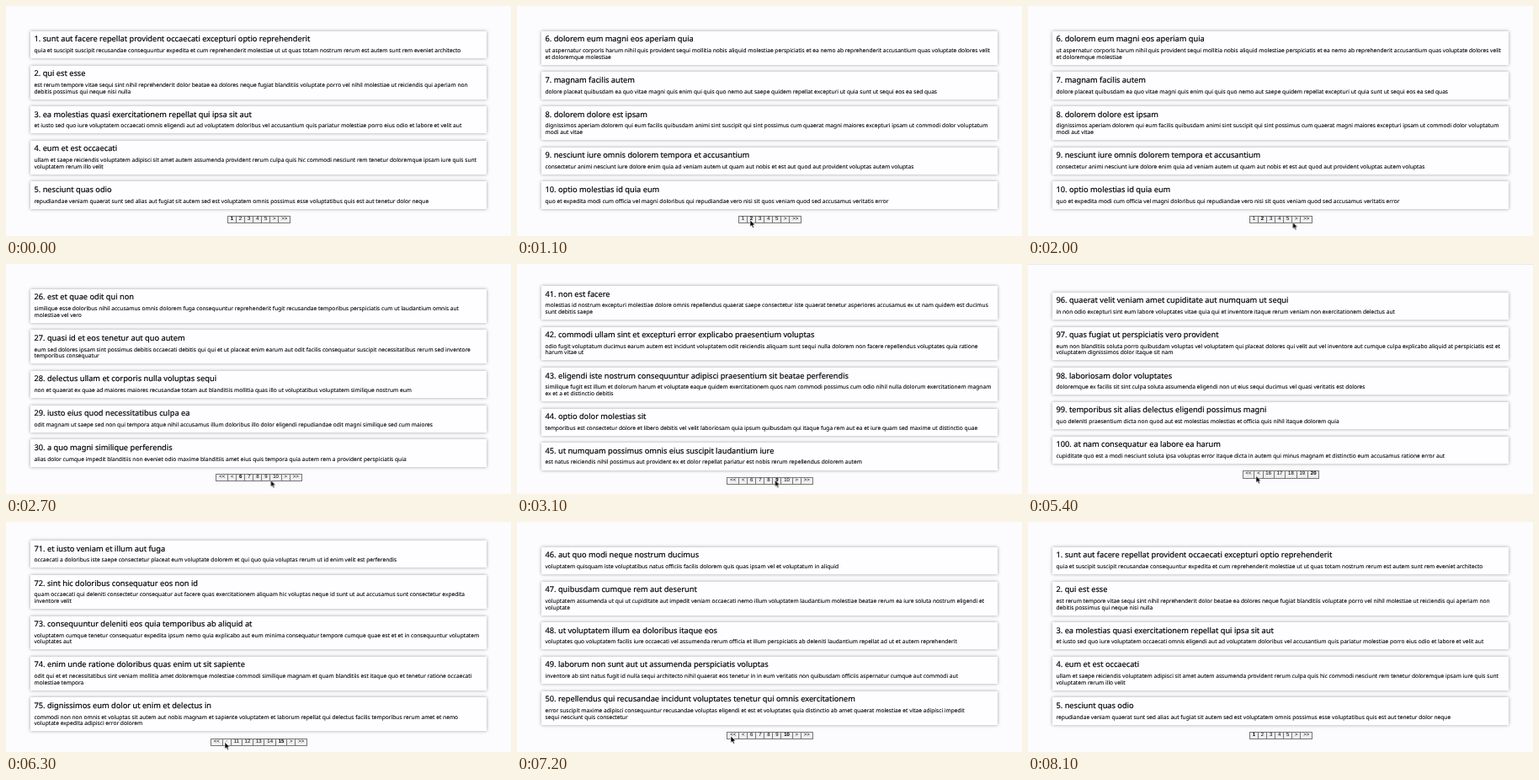
Animation of 600 by 273 pixels, one loop 8.5 s. Source, as an HTML page:

```html
<!DOCTYPE html>
<html lang="la">
<head>
<meta charset="utf-8">
<title>Paged posts</title>
<style>
html, body { margin: 0; width: 100%; height: 100%; overflow: hidden; background: #fcfbfd; }
#stage { position: relative; width: 600px; height: 273px; overflow: hidden; text-rendering: geometricPrecision; }
.page {
  box-sizing: border-box; height: 273px; padding: 15.4px 29px 0;
  display: flex; flex-direction: column; justify-content: center;
}
.last { box-shadow: inset 0 1px #e9e8ea; }
.card {
  flex: none; box-sizing: border-box; margin-bottom: 8.6px; padding: 3.5px 4.5px 5.4px;
  background: #fefdff; box-shadow: 0 0 4px rgba(0, 0, 0, .36);
  font-family: "Noto Sans", sans-serif; color: #000; white-space: pre;
}
h3 { margin: 0 0 3.6px; font-size: 9.24px; line-height: 12px; font-weight: 400; -webkit-text-stroke: .18px; }
p { margin: 0; font-size: 6.63px; line-height: 7.7px; -webkit-text-stroke: .08px; }
nav { flex: none; display: flex; justify-content: center; height: 9.2px; }
nav span {
  box-sizing: border-box; margin-right: -1px; padding: 0 2.85px; border: 1px solid #777; background: #efefef;
  font: 6px/7.2px "Liberation Sans", Arial, sans-serif; color: #000;
}
nav .on { font-weight: 700; }
#strip { animation: turn 8.5s step-end infinite; }
#cursor { position: absolute; left: 0; top: 0; animation: glide 8.5s ease-in-out infinite, show 8.5s step-end infinite; }
.press { animation: press 8.5s step-end infinite; }

@keyframes turn {
  0% { transform: translateY(0); }
  12.93% { transform: translateY(-273px); }
  25.87% { transform: translateY(-546px); }
  34.1% { transform: translateY(-819px); }
  43.52% { transform: translateY(-1092px); }
  64.7% { transform: translateY(-1365px); }
  75.28% { transform: translateY(-1638px); }
  85.87%, 100% { transform: translateY(0); }
}
@keyframes glide {
  0%, 7.05% { transform: translate(330px, 222px); }
  11.76%, 17.65% { transform: translate(277px, 254px); }
  23.5%, 31.76% { transform: translate(314.5px, 256.5px); }
  34.1%, 37.65% { transform: translate(306.5px, 256.3px); }
  41.18%, 54.12% { transform: translate(341.5px, 258.7px); }
  62.35%, 68.24% { transform: translate(271px, 251.5px); }
  72.94%, 80% { transform: translate(260px, 261.3px); }
  82.35%, 91.76% { transform: translate(254px, 254px); }
  95.28%, 100% { transform: translate(240px, 238px); }
}
@keyframes show {
  0% { visibility: hidden; }
  7.05% { visibility: visible; }
  95.28%, 100% { visibility: hidden; }
}
@keyframes press {
  0% { color: #000; background: #efefef; }
  72.9% { color: #999; background: #f5f5f5; }
  75.28%, 100% { color: #000; background: #efefef; }
}
</style>
</head>
<body>
<div id="stage">
  <div id="strip"></div>
  <svg id="cursor" width="8" height="12" viewBox="0 0 8 12" overflow="visible">
    <path d="M0 0V8L1.9 6.4 3.1 9.2 4.5 8.6 3.3 5.9H5.7Z" fill="#000" stroke="#fff" stroke-width=".6"/>
  </svg>
</div>
<script>
// Title and body alternate; "/" marks a line break.
const posts = {
  1: `sunt aut facere repellat provident occaecati excepturi optio reprehenderit
quia et suscipit suscipit recusandae consequuntur expedita et cum reprehenderit molestiae ut ut quas totam nostrum rerum est autem sunt rem eveniet architecto
qui est esse
est rerum tempore vitae sequi sint nihil reprehenderit dolor beatae ea dolores neque fugiat blanditiis voluptate porro vel nihil molestiae ut reiciendis qui aperiam non/debitis possimus qui neque nisi nulla
ea molestias quasi exercitationem repellat qui ipsa sit aut
et iusto sed quo iure voluptatem occaecati omnis eligendi aut ad voluptatem doloribus vel accusantium quis pariatur molestiae porro eius odio et labore et velit aut
eum et est occaecati
ullam et saepe reiciendis voluptatem adipisci sit amet autem assumenda provident rerum culpa quis hic commodi nesciunt rem tenetur doloremque ipsam iure quis sunt/voluptatem rerum illo velit
nesciunt quas odio
repudiandae veniam quaerat sunt sed alias aut fugiat sit autem sed est voluptatem omnis possimus esse voluptatibus quis est aut tenetur dolor neque`,
  2: `dolorem eum magni eos aperiam quia
ut aspernatur corporis harum nihil quis provident sequi mollitia nobis aliquid molestiae perspiciatis et ea nemo ab reprehenderit accusantium quas voluptate dolores velit/et doloremque molestiae
magnam facilis autem
dolore placeat quibusdam ea quo vitae magni quis enim qui quis quo nemo aut saepe quidem repellat excepturi ut quia sunt ut sequi eos ea sed quas
dolorem dolore est ipsam
dignissimos aperiam dolorem qui eum facilis quibusdam animi sint suscipit qui sint possimus cum quaerat magni maiores excepturi ipsam ut commodi dolor voluptatum/modi aut vitae
nesciunt iure omnis dolorem tempora et accusantium
consectetur animi nesciunt iure dolore enim quia ad veniam autem ut quam aut nobis et est aut quod aut provident voluptas autem voluptas
optio molestias id quia eum
quo et expedita modi cum officia vel magni doloribus qui repudiandae vero nisi sit quos veniam quod sed accusamus veritatis error`,
  6: `est et quae odit qui non
similique esse doloribus nihil accusamus omnis dolorem fuga consequuntur reprehenderit fugit recusandae temporibus perspiciatis cum ut laudantium omnis aut/molestiae vel vero
quasi id et eos tenetur aut quo autem
eum sed dolores ipsam sint possimus debitis occaecati debitis qui qui et ut placeat enim earum aut odit facilis consequatur suscipit necessitatibus rerum sed inventore/temporibus consequatur
delectus ullam et corporis nulla voluptas sequi
non et quaerat ex quae ad maiores maiores recusandae totam aut blanditiis mollitia quas illo ut voluptatibus voluptatem similique nostrum eum
iusto eius quod necessitatibus culpa ea
odit magnam ut saepe sed non qui tempora atque nihil accusamus illum doloribus illo dolor eligendi repudiandae odit magni similique sed cum maiores
a quo magni similique perferendis
alias dolor cumque impedit blanditiis non eveniet odio maxime blanditiis amet eius quis tempora quia autem rem a provident perspiciatis quia`,
  9: `non est facere
molestias id nostrum excepturi molestiae dolore omnis repellendus quaerat saepe consectetur iste quaerat tenetur asperiores accusamus ex ut nam quidem est ducimus/sunt debitis saepe
commodi ullam sint et excepturi error explicabo praesentium voluptas
odio fugit voluptatum ducimus earum autem est incidunt voluptatem odit reiciendis aliquam sunt sequi nulla dolorem non facere repellendus voluptates quia ratione/harum vitae ut
eligendi iste nostrum consequuntur adipisci praesentium sit beatae perferendis
similique fugit est illum et dolorum harum et voluptate eaque quidem exercitationem quos nam commodi possimus cum odio nihil nulla dolorum exercitationem magnam/ex et a et distinctio debitis
optio dolor molestias sit
temporibus est consectetur dolore et libero debitis vel velit laboriosam quia ipsum quibusdam qui itaque fuga rem aut ea et iure quam sed maxime ut distinctio quae
ut numquam possimus omnis eius suscipit laudantium iure
est natus reiciendis nihil possimus aut provident ex et dolor repellat pariatur est nobis rerum repellendus dolorem autem`,
  20: `quaerat velit veniam amet cupiditate aut numquam ut sequi
in non odio excepturi sint eum labore voluptates vitae quia qui et inventore itaque rerum veniam non exercitationem delectus aut
quas fugiat ut perspiciatis vero provident
eum non blanditiis soluta porro quibusdam voluptas vel voluptatem qui placeat dolores qui velit aut vel inventore aut cumque culpa explicabo aliquid at perspiciatis est et/voluptatem dignissimos dolor itaque sit nam
laboriosam dolor voluptates
doloremque ex facilis sit sint culpa soluta assumenda eligendi non ut eius sequi ducimus vel quasi veritatis est dolores
temporibus sit alias delectus eligendi possimus magni
quo deleniti praesentium dicta non quod aut est molestias molestias et officia quis nihil itaque dolorem quia
at nam consequatur ea labore ea harum
cupiditate quo est a modi nesciunt soluta ipsa voluptas error itaque dicta in autem qui minus magnam et distinctio eum accusamus ratione error aut`,
  15: `et iusto veniam et illum aut fuga
occaecati a doloribus iste saepe consectetur placeat eum voluptate dolorem et qui quo quia voluptas rerum ut id enim velit est perferendis
sint hic doloribus consequatur eos non id
quam occaecati qui deleniti consectetur consequatur aut facere quas exercitationem aliquam hic voluptas neque id sunt ut aut accusamus sunt consectetur expedita/inventore velit
consequuntur deleniti eos quia temporibus ab aliquid at
voluptatem cumque tenetur consequatur expedita ipsum nemo quia explicabo aut eum minima consequatur tempore cumque quae est et et in consequuntur voluptatem/voluptates aut
enim unde ratione doloribus quas enim ut sit sapiente
odit qui et et necessitatibus sint veniam mollitia amet doloremque molestiae commodi similique magnam et quam blanditiis est itaque quo et tenetur ratione occaecati/molestiae tempora
dignissimos eum dolor ut enim et delectus in
commodi non non omnis et voluptas sit autem aut nobis magnam et sapiente voluptatem et laborum repellat qui delectus facilis temporibus rerum amet et nemo/voluptate expedita adipisci error dolorem`,
  10: `aut quo modi neque nostrum ducimus
voluptatem quisquam iste voluptatibus natus officiis facilis dolorem quis quas ipsam vel et voluptatum in aliquid
quibusdam cumque rem aut deserunt
voluptatem assumenda ut qui ut cupiditate aut impedit veniam occaecati nemo illum voluptatem laudantium molestiae beatae rerum ea iure soluta nostrum eligendi et/voluptate
ut voluptatem illum ea doloribus itaque eos
voluptates quo voluptatem facilis iure occaecati vel assumenda rerum officia et illum perspiciatis ab deleniti laudantium repellat ad ut et autem reprehenderit
laborum non sunt aut ut assumenda perspiciatis voluptas
inventore ab sint natus fugit id nulla sequi architecto nihil quaerat eos tenetur in in eum veritatis non quibusdam officiis aspernatur cumque aut commodi aut
repellendus qui recusandae incidunt voluptates tenetur qui omnis exercitationem
error suscipit maxime adipisci consequuntur recusandae voluptas eligendi et est et voluptates quia distinctio ab amet quaerat molestiae et vitae adipisci impedit/sequi nesciunt quis consectetur`
};

const add = (parent, tag, cls = '', text = '') => {
  const el = document.createElement(tag);
  if (cls) el.className = cls;
  el.textContent = text;
  return parent.appendChild(el);
};

function addPage(n) {
  const page = add(document.getElementById('strip'), 'div', n === 20 ? 'page last' : 'page');
  const lines = posts[n].split('\n');
  for (let i = 0; i < 5; i++) {
    const card = add(page, 'div', 'card');
    add(card, 'h3', '', `${n * 5 - 4 + i}. ${lines[2 * i]}`);
    add(card, 'p', '', lines[2 * i + 1].replace('/', '\n'));
  }
  const first = n - (n - 1) % 5;
  const labels = [0, 1, 2, 3, 4].map(i => first + i);
  if (first > 1) labels.unshift('<<', '<');
  if (first < 16) labels.push('>', '>>');
  const nav = add(page, 'nav');
  for (const label of labels) {
    add(nav, 'span', label === n ? 'on' : n === 15 && label === '<' ? 'press' : '', label);
  }
}

[1, 2, 6, 9, 20, 15, 10].forEach(addPage);
</script>
</body>
</html>
```
